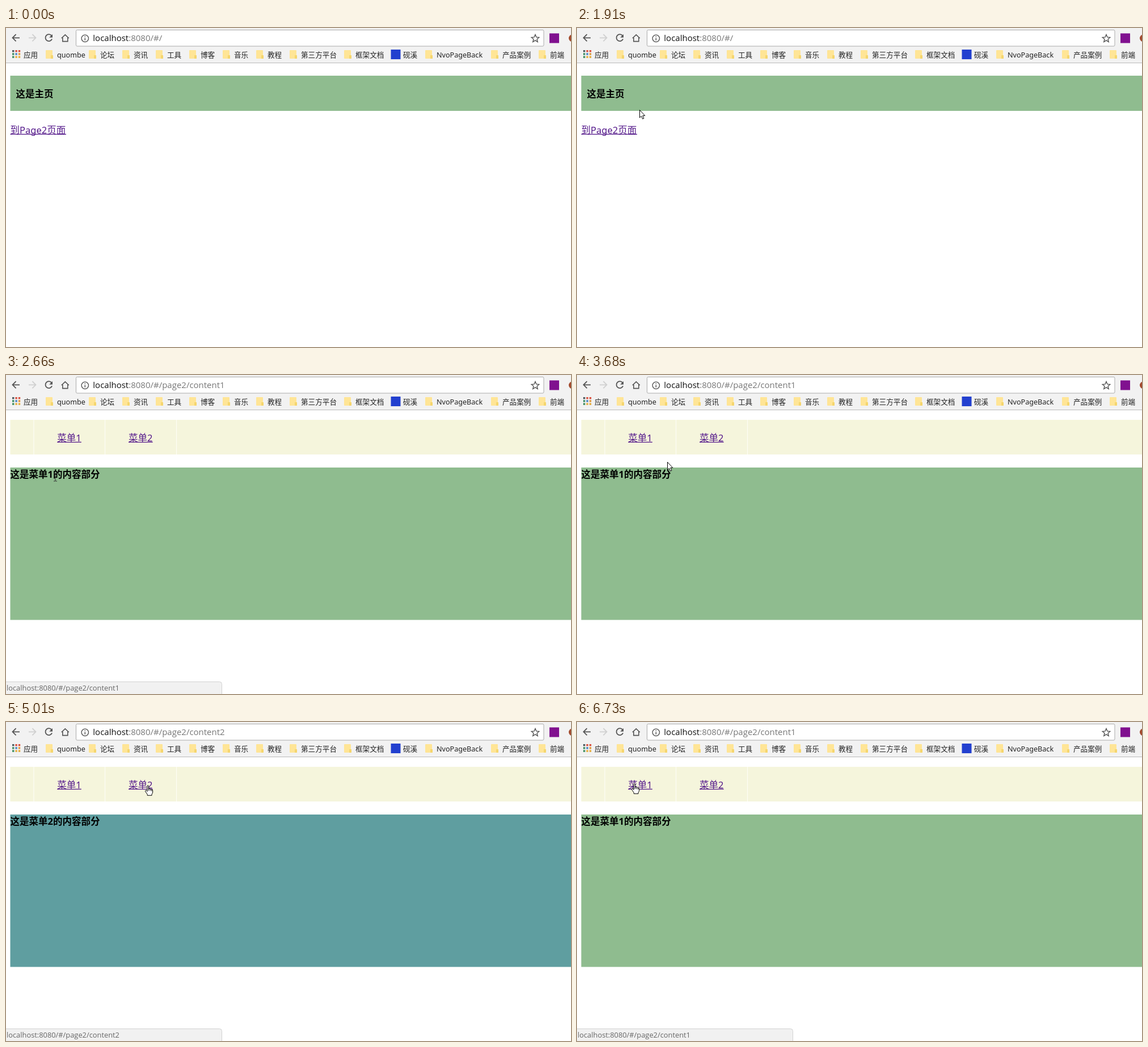
An HTML page that plays this animation: 996 px wide and 562 px high, repeating every 8 s.

```html
<!DOCTYPE html>
<html lang="zh-CN">
<head>
<meta charset="utf-8">
<title>Router demo</title>
<style>
  html, body { margin: 0; width: 100%; height: 100%; overflow: hidden; background: #fff; }
  svg { display: block; width: 996px; height: 562px; }
  text { font: 16.5px "Noto Sans", "Noto Sans CJK SC", "Noto Sans CJK", sans-serif; white-space: pre; }
  .title { font-weight: 700; }
  .link { fill: #551a8b; }
  .link.hot { fill: #f00; }
  .url { font: 15px "Open Sans", sans-serif; fill: #777; }
  .bookmarks text { font-size: 12.6px; fill: #222; }
  .status { font: 12.85px "Open Sans", sans-serif; fill: #666; }
  .icon { fill: none; stroke: #555; stroke-width: 1.8; }
</style>
</head>
<body>
<svg viewBox="0 0 996 562" xmlns="http://www.w3.org/2000/svg">
  <g id="home">
    <rect x="7.5" y="84" width="989" height="62" fill="#8fbc8f"/>
    <text class="title" x="17.5" y="122">这是主页</text>
    <g class="link" id="toPage2">
      <text x="7.5" y="185.5">到Page2页面</text>
      <rect x="7.5" y="186.6" width="98.5" height="1.3"/>
    </g>
  </g>

  <g id="page2">
    <rect x="7.5" y="79" width="989" height="61" fill="#f5f5dc"/>
    <path d="M49 79V140M174.5 79V140M300.5 79V140" stroke="#fcfcf3" stroke-width="1.3"/>
    <g class="link" id="menu1">
      <text x="90.2" y="116.5">菜单1</text>
      <rect x="90.2" y="117.7" width="42.6" height="1.3"/>
    </g>
    <g class="link" id="menu2">
      <text x="216" y="116.5">菜单2</text>
      <rect x="216" y="117.7" width="42.6" height="1.3"/>
    </g>
    <rect id="panel" x="7.5" y="163" width="989" height="268.5"/>
    <text class="title" id="panelTitle" x="7.5" y="181"></text>
  </g>

  <g id="status">
    <path d="M-1 540.5H376.5Q380.5 540.5 380.5 544.5V563H-1Z" fill="#f1f1f1" stroke="#d2d2d2"/>
    <text class="status" id="statusText" x="1" y="556"></text>
  </g>

  <rect width="996" height="61" fill="#f2f2f2"/>
  <rect y="61" width="996" height="1" fill="#b8b8b8"/>
  <rect id="hover" y="5.5" width="25" height="25" rx="2" fill="#e1e1e1"/>
  <circle id="press" cx="75.5" cy="18" r="16.3" fill="#d2d2d2"/>
  <g class="icon">
    <path d="M24 17.3H12M17.6 11.2L11.5 17.3L17.6 23.4"/>
    <path d="M40 17.3H52M46.4 11.2L52.5 17.3L46.4 23.4" stroke="#d0d0d0"/>
    <path d="M80.2 13.4A6 6 0 1 0 81.1 19.4"/>
    <path d="M82 11V16.8H76.2Z" fill="#555" stroke="none"/>
    <path d="M97.8 18L104.3 11.8L110.8 18M99.8 17V23.6H108.8V17" stroke-width="1.6"/>
  </g>
  <rect x="123.5" y="3.5" width="824.5" height="28.5" rx="2" fill="#fff" stroke="#aaa"/>
  <g class="icon" stroke-width="1.4">
    <circle cx="139.3" cy="18.3" r="6.2" style="stroke-width:1.4"/>
    <path d="M139.3 17.4V21.8M139.3 14.6V16.1" style="stroke-width:1.5"/>
    <path d="M933 11.6L934.9 16.1L939.7 16.5L936 19.7L937.2 24.4L933 21.8L928.8 24.4L930 19.7L926.3 16.5L931.1 16.1Z" style="stroke-width:1.4"/>
  </g>
  <text class="url" x="153.3" y="23"><tspan fill="#111">localhost</tspan><tspan id="path"></tspan></text>
  <rect x="958" y="9.5" width="17" height="17" fill="#80108f"/>
  <circle cx="998.5" cy="18" r="6.5" fill="#a24a2c"/>
  <g class="bookmarks" id="bookmarks"></g>

  <g id="cursor" stroke="#000" fill="#fff" stroke-linejoin="round">
    <path id="arrow" d="M.5 .5V14L3.5 11.2L5.6 16.2L7.9 15.2L5.8 10.4H9.8Z"/>
    <path id="hand" d="M-1 1.5Q0 -.3 1.3 1.5V7Q3.2 5.8 4.1 7.5Q6 6.6 6.7 8.2Q8.6 7.8 8.6 10V13Q8.4 14.4 7 16.3V18.3H-.8V16.4L-4.4 11.3Q-5 9.6 -3.4 9.3Q-2.4 9.4 -1 11.4Z M1.3 7V10M4.1 7.5V10.3M6.7 8.2V10.8"/>
    <path id="beam" d="M-3 -7H-1Q0 -7 0 -6Q0 -7 1 -7H3M0 -6V6M-3 7H-1Q0 7 0 6Q0 7 1 7H3" fill="none" stroke="#333"/>
  </g>
</svg>
<script>
const LOOP = 8000;
const el = id => document.getElementById(id);
const show = (id, on) => el(id).style.display = on ? "" : "none";

const bookmarks = [
  [90, "quombe"], [166, "论坛"], [225, "资讯"], [284, "工具"], [343, "博客"],
  [402, "音乐"], [461, "教程"], [520, "第三方平台"], [616, "框架文档"],
  [700, "砚溪", "#2340cf"], [759, "NvoPageBack"], [875, "产品案例"], [959, "前端"]
];
const folder = x => `<rect x="${x}" y="39" width="12" height="15" rx="1" fill="#ffe596"/>
  <path d="M${x + 9} 48H${x + 13}V54H${x + 9}Z" fill="#f5d66f"/>`;
const square = (x, color) => `<rect x="${x - 1.5}" y="38" width="17" height="17" fill="${color}"/>`;
const dots = ["#4d5a5e", "#d9503f", "#d9503f", "#3f8f62", "#4a82c4", "#e09a3c", "#3f8f62", "#e5ad3e", "#e5ad3e"]
  .map((c, i) => `<rect x="${11 + i % 3 * 5.4}" y="${39 + Math.floor(i / 3) * 5.2}" width="3.4" height="3.4" fill="${c}"/>`);
el("bookmarks").innerHTML = dots.join("") + '<text x="31" y="52">应用</text>' +
  bookmarks.map(([x, label, color]) =>
    (color ? square(x - 20, color) : folder(x - 20)) + `<text x="${x}" y="52">${label}</text>`).join("");

// Pointer moves: start, end, number of steps, target x, target y
const moves = [
  [120, 120, 1, 629, 452],
  [199, 910, 10, 11, 11],
  [970, 1040, 2, 52, 35],
  [1110, 1180, 2, 79, 15],
  [1510, 2060, 7, 122, 195],
  [2200, 2600, 6, 87, 180],
  [3360, 4150, 11, 246, 121],
  [4240, 4560, 5, 250, 112],
  [5010, 5010, 1, 250, 111],
  [5240, 5240, 1, 250, 110],
  [5530, 5950, 6, 101, 108]
];

function pointerAt(t) {
  let x = 629, y = 452;
  for (const [start, end, steps, toX, toY] of moves) {
    if (t < start) break;
    const step = end > start ? Math.floor((t - start) / (end - start) * (steps - 1) + 1e-6) + 1 : steps;
    const u = Math.min(1, step / steps);
    x += (toX - x) * u;
    y += (toY - y) * u;
  }
  return [x, y];
}

function cursorKind(x, y, onHome) {
  const over = (l, top, r, b) => x >= l && x <= r && y >= top && y <= b;
  if (onHome) return over(8, 169, 106, 190) ? "hand" : "arrow";
  if (over(90, 101, 133, 120) || over(216, 101, 259, 120)) return "hand";
  return over(8, 164, 168, 187) ? "beam" : "arrow";
}

function statusOpacity(t) {
  if (t < 2360) return 0;
  if (t < 2980) return Math.min(1, (t - 2300) / 180);
  if (t < 3130) return t < 3055 ? 0.66 : 0.33;
  if (t < 4320) return 0;
  return Math.min(1, (t - 4260) / 180);
}

function render(t) {
  const onHome = t < 2660;
  const tab = t >= 4690 && t < 6730 ? 2 : 1;
  const statusTab = t >= 4240 && t < 5866 ? 2 : 1;

  show("home", onHome);
  show("page2", !onHome);
  el("path").textContent = ":8080/#/" + (onHome ? "" : "page2/content" + tab);
  el("panel").setAttribute("fill", tab === 1 ? "#8fbc8f" : "#5f9ea0");
  el("panelTitle").textContent = `这是菜单${tab}的内容部分`;
  el("toPage2").classList.toggle("hot", t >= 2360);
  el("menu2").classList.toggle("hot", t >= 4240 && t < 4690);
  el("menu1").classList.toggle("hot", t >= 6490 && t < 6730);

  el("status").setAttribute("opacity", statusOpacity(t));
  el("statusText").textContent = "localhost:8080/#/page2/content" + statusTab;

  const [x, y] = pointerAt(t);
  const kind = cursorKind(x, y, onHome);
  show("cursor", t >= 120);
  for (const id of ["arrow", "hand", "beam"]) show(id, id === kind);
  el("cursor").setAttribute("transform", `translate(${Math.round(x)} ${Math.round(y)})`);

  const button = [5, 63, 92].find(left => y < 31 && x >= left && x <= left + 25);
  show("hover", button !== undefined);
  if (button !== undefined) el("hover").setAttribute("x", button);
  show("press", t >= 1370 && t < 1510);
}

const began = performance.now();
function frame() {
  render((performance.now() - began) % LOOP);
  requestAnimationFrame(frame);
}
frame();
</script>
</body>
</html>
```
